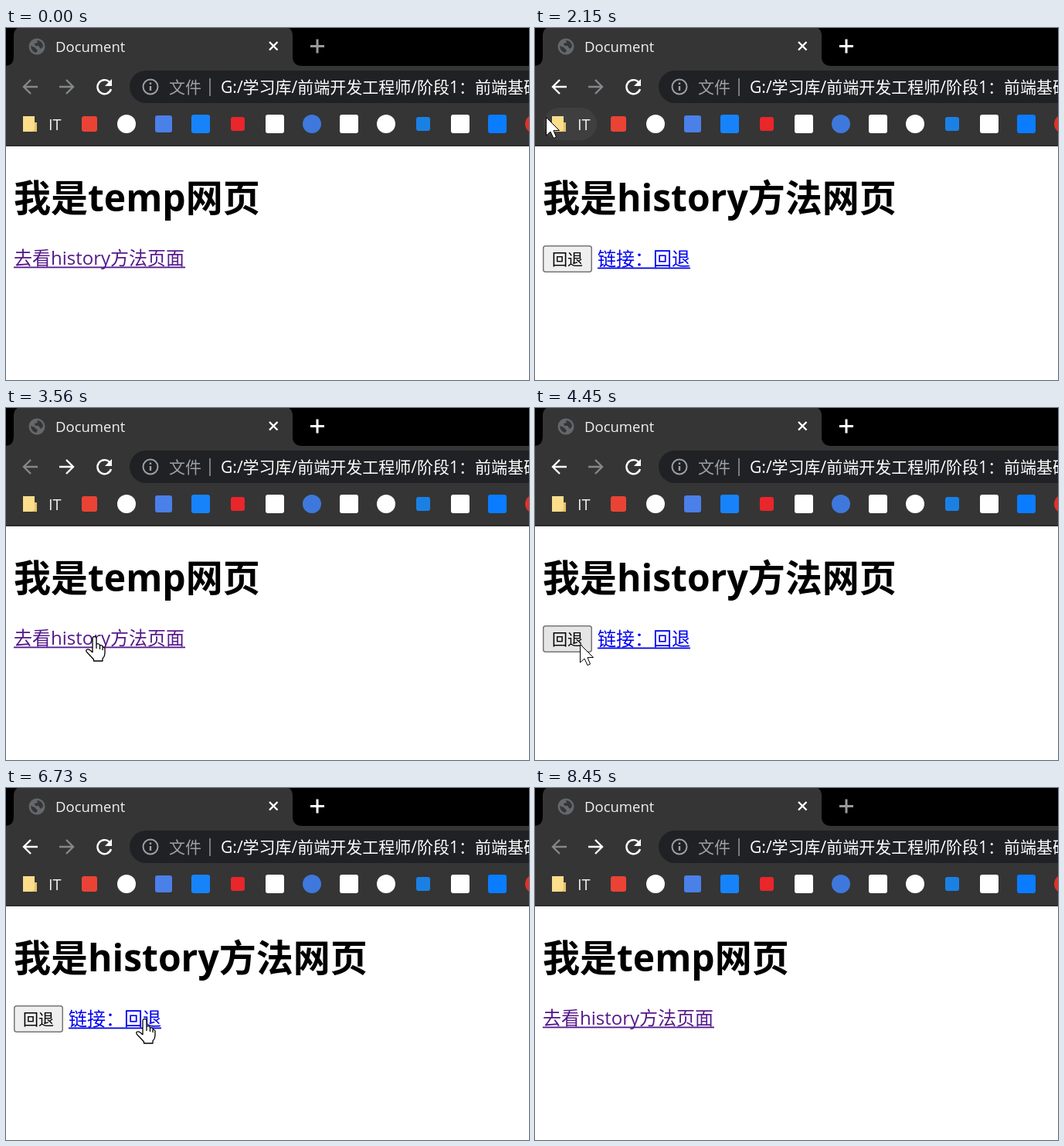
Recreate the animation shown at these times as an HTML page. Size 677 px wide and 455 px high, loop 8520 ms.

```html
<!DOCTYPE html>
<html lang="zh">
<head>
<meta charset="utf-8">
<title>Document</title>
<style>
html, body { margin: 0; width: 100%; height: 100%; overflow: hidden; background: #fff; }
svg { display: block; width: 677px; height: 455px; }
text { font-family: "Open Sans", "Noto Sans CJK SC", "Noto Sans CJK", sans-serif; font-size: 24px; white-space: pre; }
.h1 { font-size: 48px; font-weight: 700; }
.line { fill: none; stroke-width: 2.4; }
</style>
</head>
<body>
<svg viewBox="0 0 677 455">
  <rect width="677" height="455" fill="#fff"/>
  <rect width="677" height="153" fill="#000"/>
  <path fill="#353535" d="M0 49Q10 48 10 37V10Q10 0 20-2H361Q371 0 371 10V37Q371 48 382 49H677V152H0Z"/>
  <rect y="151" width="677" height="2" fill="#2b2b2b"/>

  <!-- tab -->
  <circle cx="40" cy="24" r="10.5" fill="#64686c"/>
  <path fill="#353535" d="M32 23L37 25L41 29L39 32Q33 31 32 23ZM40 16Q47 16 48 24L45 27L42 23H38L37 20L41 19Z"/>
  <text x="64" y="31" fill="#f1f1f1" style="font-size:18.5px">Document</text>
  <path class="line" stroke="#fff" d="M341 18l10.500 10.500m0-10.500l-10.500 10.500"/>
  <path id="plus" class="line" style="stroke-width:3" d="M394 23.500h18m-9-9v18"/>

  <!-- toolbar -->
  <circle id="backHover" cx="31" cy="76" r="20" fill="#4a4a4a"/>
  <path id="back" class="line" d="M41 76H23m9-9l-9 9l9 9"/>
  <path id="next" class="line" d="M69 76H87m-9-9l9 9l-9 9"/>
  <path class="line" stroke="#fff" d="M134 70A9 9 0 1 0 136 79"/>
  <path fill="#fff" d="M137 66V75H128Z"/>
  <rect x="160" y="55" width="560" height="42" rx="21" fill="#202124"/>
  <circle class="line" cx="187" cy="76" r="9.500" stroke="#9aa0a6" style="stroke-width:2"/>
  <path class="line" stroke="#9aa0a6" d="M187 75v6m0-10.500v2.500"/>
  <text x="211" y="84" fill="#9aa0a6" style="font-size:21px">文件</text>
  <path stroke="#777b80" stroke-width="2" d="M264 65V88"/>
  <text x="278" y="84" fill="#fff" style="font-size:21px">G:/学习库/前端开发工程师/阶段1：前端基础</text>

  <!-- bookmarks -->
  <rect id="markHover" x="11" y="103" width="69" height="42" rx="21" fill="#3f3f3f"/>
  <path fill="#fbdd8b" d="M22 114H37V134H22Z"/>
  <path fill="#e6c169" d="M37 122H40V134H34L37 131Z"/>
  <text x="55" y="132" fill="#f1f1f1" style="font-size:20px">IT</text>
  <g id="marks"></g>

  <!-- pages -->
  <g id="temp">
    <text class="h1" x="10" y="237">我是temp网页</text>
    <g id="go"><text x="10" y="306">去看history方法页面</text><rect x="10" y="308.500" width="222" height="1.800"/></g>
  </g>
  <g id="hist">
    <text class="h1" x="10" y="237">我是history方法网页</text>
    <rect id="btn" x="10.750" y="281.750" width="62.500" height="33.500" rx="3" stroke="#767676" stroke-width="1.500"/>
    <text x="22" y="307" style="font-size:20px">回退</text>
    <g id="ret"><text x="81" y="307">链接：回退</text><rect x="81" y="309.500" width="120" height="1.800"/></g>
  </g>

  <g id="cursor">
    <circle id="spot" r="18" fill="#ffeb3b" opacity=".75"/>
    <path id="arrow" fill="#fff" stroke="#000" d="M.5.500V24L6 19L10 27.500L13.500 26L10 17.500H17.500Z"/>
    <path id="hand" fill="#fff" stroke="#000" stroke-width="1.300" stroke-linejoin="round"
      d="M-3 21V3Q-3 .5-.5.500T2 3V11Q3 9 5 10T6.500 13Q7 11 9 12T10 15Q12 13.500 13 16V22Q13 26 10 29V32H-1.500V30Q-6 25-10 21Q-12.500 18-10 17T-3 21M2 11V16M6.500 13V17M10 15V18"/>
  </g>
</svg>
<script>
const $ = id => document.getElementById(id);
const LOOP = 8520;

// plain bookmark icons: colour, round?, size
const icons = [['#ea4335', 0, 20], ['#fff', 1, 24], ['#4a80e8', 0, 22], ['#1683fb', 0, 24],
  ['#e8262b', 0, 18], ['#fff', 0, 24], ['#3f78dc', 1, 24], ['#fff', 0, 24], ['#fff', 1, 24],
  ['#1b80e4', 0, 18], ['#fff', 0, 24], ['#0a7cff', 0, 24], ['#e0322b', 1, 24]];
$('marks').innerHTML = icons.map(([color, round, size], i) =>
  `<rect x="${108 + 48 * i - size / 2}" y="${124 - size / 2}" width="${size}" height="${size}"
    rx="${round ? size / 2 : 3}" fill="${color}"/>`).join('');

// cursor moves: number of steps, then [ms, x, y] points
const moves = [
  [8, [260, 497, 405], [400, 330, 350], [540, 190, 312], [750, 131, 300]],
  [8, [1950, 125, 302], [2020, 95, 275], [2150, 14, 115], [2290, 13, 85], [2420, 29, 72]],
  [12, [2820, 32, 80], [2960, 45, 140], [3160, 90, 290], [3290, 126, 322], [3420, 122, 305], [3560, 115, 295]],
  [10, [3960, 114, 310], [4090, 110, 370], [4200, 95, 396], [4320, 70, 340], [4450, 57, 303], [4520, 50, 300], [4580, 46, 300]],
  [2, [5660, 70, 296], [5730, 79, 295]],
  [10, [6130, 82, 305], [6270, 95, 350], [6400, 130, 363], [6540, 175, 330], [6730, 180, 298]],
  [3, [7650, 210, 330], [7720, 300, 390], [7780, 361, 411]]
];
const presses = [[1220, 1360], [2560, 2690], [3690, 3830], [4910, 4980], [5930, 6070], [7000, 7130]];
const swaps = [1430, 2690, 3900, 5050, 6130, 7200];

const onHistory = t => swaps.filter(s => t >= s).length % 2 === 1;

function pointer(t) {
  const move = moves.filter(m => t >= m[1][0]).pop();
  if (!move || t >= 7850) return null;
  const [steps, ...pts] = move;
  const start = pts[0][0], end = pts[pts.length - 1][0], gap = (end - start) / (steps - 1);
  const at = Math.min(end, start + Math.floor((t - start + 4) / gap) * gap);
  const i = Math.max(1, pts.findIndex(p => p[0] >= at - .01));
  const a = pts[i - 1], b = pts[i], k = (at - a[0]) / (b[0] - a[0]);
  return { x: a[1] + (b[1] - a[1]) * k, y: a[2] + (b[2] - a[2]) * k, at };
}

const show = (id, on) => $(id).style.display = on ? '' : 'none';
const inside = (p, x0, y0, x1, y1) => !!p && p.x >= x0 && p.x <= x1 && p.y >= y0 && p.y <= y1;

function draw(t) {
  const p = pointer(t), hist = onHistory(t);
  const down = presses.some(([a, b]) => t >= a && t < b);
  const lit = on => on ? '#fff' : '#85888b';
  show('temp', !hist);
  show('hist', hist);
  $('back').setAttribute('stroke', lit(hist));
  $('next').setAttribute('stroke', lit(!hist && t > swaps[0]));
  $('plus').setAttribute('stroke', t >= 1220 && t < 8450 ? '#fff' : '#9a9a9a');
  show('backHover', hist && inside(p, 11, 56, 51, 96));
  show('markHover', inside(p, 11, 103, 80, 145));

  const onGo = inside(p, 10, 286, 232, 314), onRet = inside(p, 81, 286, 201, 314);
  $('go').setAttribute('fill', down && onGo ? '#f00' : '#551a8b');
  $('ret').setAttribute('fill', down && onRet ? '#f00' : '#00e');
  $('btn').setAttribute('fill', inside(p, 10, 281, 74, 316) ? '#e5e5e5' : '#efefef');

  show('cursor', p);
  if (!p) return;
  // the pointer shape only updates when the mouse moves
  const link = onHistory(p.at) ? onRet : onGo;
  $('cursor').setAttribute('transform', `translate(${Math.round(p.x)} ${Math.round(p.y)})`);
  show('hand', link);
  show('arrow', !link);
  show('spot', down);
}

function tick() {
  draw(performance.now() % LOOP);
  requestAnimationFrame(tick);
}
tick();
</script>
</body>
</html>
```
